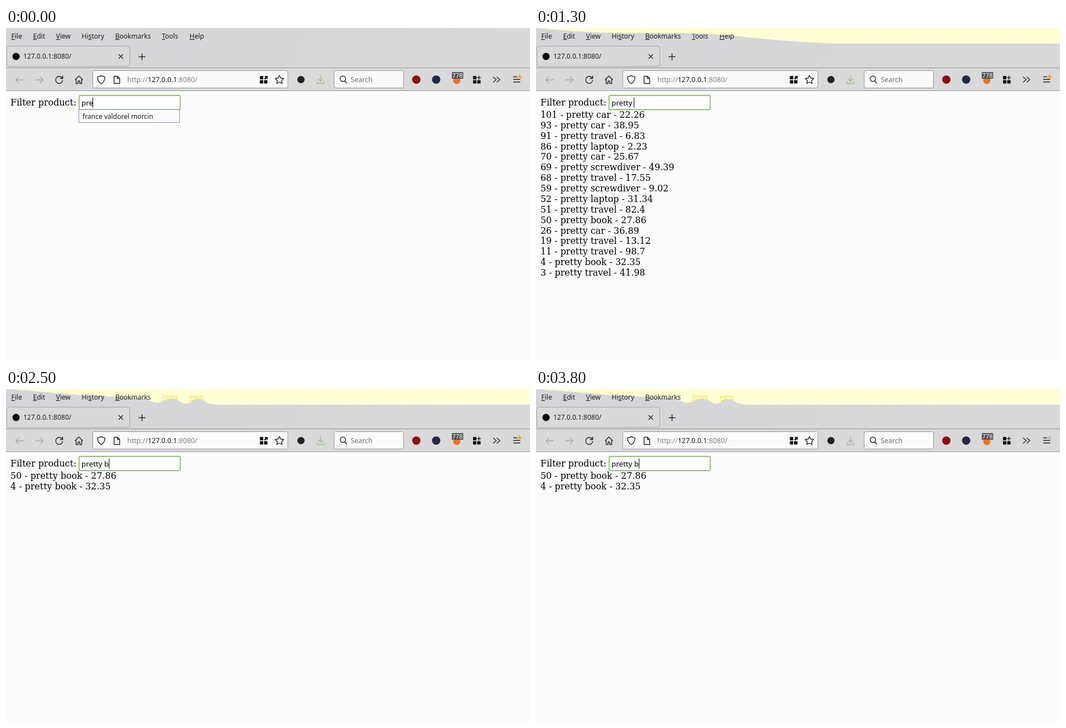
Recreate the animation shown at these times as an HTML page. Size 938 by 597 pixels, loop 3900 ms.

```html
<!DOCTYPE html>
<html lang="en">
<head>
<meta charset="utf-8">
<title>Product filter</title>
<style>
  html, body { margin: 0; width: 100%; height: 100%; overflow: hidden; background: #fcfcfd; }
  svg { display: block; }
  text { white-space: pre; }
  .ui { font: 12px "Noto Sans", sans-serif; fill: #1c1c1c; }
  .field { font-size: 12.4px; }
  .page { font: 15.9px "DejaVu Serif", serif; fill: #000; }
  .typed { font: 13.33px "Noto Sans", sans-serif; fill: #000; }
  .icon { fill: none; stroke: #222; stroke-width: 1.4; stroke-linecap: round; stroke-linejoin: round; }
  .pale { stroke: #a9aaa3; }
  .solid { fill: #111; }
</style>
</head>
<body>
<svg width="938" height="597" viewBox="0 0 938 597">
  <defs>
    <linearGradient id="chrome">
      <stop offset="0" stop-color="#d5d5d9"/>
      <stop offset="1" stop-color="#d9d9d8"/>
    </linearGradient>
    <linearGradient id="glow" x2="0" y2="28" gradientUnits="userSpaceOnUse">
      <stop offset="0" stop-color="#ffffce"/>
      <stop offset="1" stop-color="#ffffdc"/>
    </linearGradient>
    <clipPath id="belowWash"><path d="M0 0L140 9L260 10L345 12H938V30H0Z"/></clipPath>
  </defs>

  <rect width="938" height="597" fill="#fcfcfd"/>
  <rect width="938" height="112" fill="url(#chrome)"/>
  <rect y="72" width="938" height="40" fill="#d9d9d9"/>
  <path d="M0 71.5H938M0 112.5H938" stroke="#97979b"/>

  <path id="wash" fill="url(#glow)"/>
  <g id="menu" class="ui"></g>

  <!-- tab -->
  <rect x="1.5" y="32.5" width="220" height="36.5" rx="4" fill="#d9d9d9" stroke="#a6a6ac"/>
  <circle cx="18" cy="51" r="6.5"/>
  <text class="ui" x="31" y="55">127.0.0.1:8080/</text>
  <path class="icon" d="M202 47.5l7 7m0-7l-7 7M238 51.5h11M243.5 46v11"/>

  <!-- navigation -->
  <path class="icon pale" d="M31 93H17.5m5.5-5.5L17.5 93l5.5 5.5M53 93h13.5m-5.5-5.5l5.5 5.5l-5.5 5.5"/>
  <path class="icon" d="M100.5 89.5a6.3 6.3 0 1 0 1 4.5M101.5 86v4.5h-4.5"/>
  <path class="icon" d="M124 92.5l6.5-6.5l6.5 6.5M125.500 91.500v8h3.500v-4.500h3v4.500h3.500v-8"/>

  <!-- address and search fields -->
  <g fill="#fafafb" stroke="#9b9ba0">
    <rect x="155.5" y="76.5" width="349" height="31" rx="3"/>
    <rect x="587.5" y="76.5" width="124" height="31" rx="3"/>
  </g>
  <path class="icon" d="M170.5 85.5l6.5 2.3c0 6-2 9.700-6.5 12.200c-4.5-2.5-6.5-6.200-6.5-12.200z"/>
  <path class="icon" d="M193.5 86.5h6l4 4v9h-10zM199.5 86.5v4h4"/>
  <text class="ui field" x="217" y="97"><tspan fill="#808080">http://</tspan>127.0.0.1<tspan fill="#808080">:8080/</tspan></text>
  <path class="solid" d="M454.5 86h6v6h-6zm0 7.5h6v6h-6zm7.5 0h6v6h-6z"/>
  <path class="solid" d="M462.5 86h6v6l-2-2l-2.5 2.5l-2-2l2.5-2.5z"/>
  <path id="star" class="icon"/>
  <circle cx="603" cy="91" r="4.8" class="icon"/>
  <path class="icon" d="M606.5 95l3.5 4"/>
  <text class="ui field" x="617" y="97" style="fill:#707070">Search</text>

  <!-- toolbar buttons -->
  <circle cx="528" cy="92.5" r="6.5" fill="#222"/>
  <path class="icon" style="stroke:#a3bb98" d="M563 85.5v10m-4-4l4 4l4-4M557 96v3.5h12V96"/>
  <circle cx="734.5" cy="92.5" r="7.5" fill="#8d0b14"/>
  <circle cx="770" cy="92.5" r="7.5" fill="#252947"/>
  <circle cx="807" cy="94" r="6.5" fill="#ee7129"/>
  <rect x="798" y="79" width="20.5" height="12" rx="1" fill="#555"/>
  <text class="ui" x="808.2" y="89" text-anchor="middle" style="font-size:11px;fill:#fff">778</text>
  <path class="solid" d="M836 86h6v6h-6zm0 7.5h6v6h-6zm7.5 0h6v6h-6z"/>
  <path class="icon" d="M846.5 86v6M843.5 89h6"/>
  <path class="icon" d="M872.5 88l5 4.5l-5 4.5M879 88l5 4.5l-5 4.5"/>
  <path class="icon" d="M908.5 87.5h6M908.5 92.2h11.5M908.5 96.8h11.5"/>
  <path id="alert" d="M919.5 82.5l4 7h-8z"/>

  <!-- page -->
  <text class="page" x="8" y="139">Filter product:</text>
  <rect x="129.5" y="119.5" width="183.5" height="28" rx="3" fill="none" stroke="#e4f0dc"/>
  <rect x="131" y="121" width="180.7" height="25.3" rx="2" fill="#fff" stroke="#79ae58" stroke-width="1.4"/>
  <text id="typed" class="typed" x="135" y="139"></text>
  <path id="caret" stroke="#000" d="M.5 124.5v18.5"/>
  <g id="rows" class="page"></g>
  <g id="suggestion">
    <rect x="130.5" y="146.5" width="180" height="23" fill="#fcfcfd" stroke="#9292b4"/>
    <text class="ui" x="137" y="163">france valdorel morcin</text>
  </g>
</svg>

<script>
const LOOP = 3900;
const $ = id => document.getElementById(id);

function addText(parent, x, y, content) {
  const node = document.createElementNS("http://www.w3.org/2000/svg", "text");
  node.setAttribute("x", x);
  node.setAttribute("y", y);
  node.textContent = content;
  parent.append(node);
  return node;
}

// Menu labels: position, text, index of the underlined letter
const menu = [
  [9.5, "File", 0], [48.5, "Edit", 0], [89.5, "View", 0], [135.5, "History", 2],
  [195.5, "Bookmarks", 0], [279, "Tools", 0], [328.5, "Help", 0]
];
const labels = menu.map(([x, label, key]) => {
  const node = addText($("menu"), x, 19, label.slice(0, key));
  const accent = document.createElementNS(node.namespaceURI, "tspan");
  accent.setAttribute("text-decoration", "underline");
  accent.textContent = label[key];
  node.append(accent, label.slice(key + 1));
  return node;
});
const tintedLabels = labels.slice(-2);

const starPoints = Array.from({ length: 10 }, (_, i) => {
  const angle = i * Math.PI / 5, radius = i % 2 ? 4 : 8;
  return `${489.5 + radius * Math.sin(angle)} ${93 - radius * Math.cos(angle)}`;
});
$("star").setAttribute("d", `M${starPoints.join("L")}Z`);

const products = `101 - pretty car - 22.26
93 - pretty car - 38.95
91 - pretty travel - 6.83
86 - pretty laptop - 2.23
70 - pretty car - 25.67
69 - pretty screwdiver - 49.39
68 - pretty travel - 17.55
59 - pretty screwdiver - 9.02
52 - pretty laptop - 31.34
51 - pretty travel - 82.4
50 - pretty book - 27.86
26 - pretty car - 36.89
19 - pretty travel - 13.12
11 - pretty travel - 98.7
4 - pretty book - 32.35
3 - pretty travel - 41.98`.split("\n");
const books = products.filter(line => line.includes("book"));
const rows = products.map((_, i) => addText($("rows"), 8, Math.round(161 + i * 18.87), ""));

const smoothWash = "M0 0Q70 7 140 9L265 9Q310 10 355 14Q450 25 540 28H938V0Z";
const bumpyWash = "M0 0L65 5L135 11L195 14Q230 15 255 19Q263 25 272 24.5Q281 24 285 20" +
  "Q300 15 309 20Q315 27 324 26Q331 25 333 20Q346 15 356 22Q362 28 382 28H938V0Z";

// Each list holds [start time, value]; a value lasts until the next start.
const typing = [[0, "pre"], [200, "pret"], [400, "pretty"], [800, "pretty "], [1500, "pretty b"]];
const results = [
  [0, []], [200, products.slice(0, 10)], [400, products], [500, []],
  [700, products], [900, []], [1100, products], [1800, []], [2000, books]
];
const washes = [[0, ""], [100, bumpyWash], [900, smoothWash], [2200, bumpyWash]];
const carets = [[0, true], [2000, false], [2400, true], [2900, false], [3400, true]];
const alerts = [[0, "#ff9d1c"], [3400, "#b9b9b9"]];

const valueAt = (steps, time) => steps.findLast(([start]) => start <= time)[1];
const show = (id, visible) => $(id).setAttribute("visibility", visible ? "visible" : "hidden");

const pen = document.createElement("canvas").getContext("2d");
pen.font = '13.33px "Noto Sans", sans-serif';

function drawWash(shape) {
  $("wash").setAttribute("d", shape);
  $("menu").setAttribute("clip-path", shape ? "url(#belowWash)" : "none");
  for (const label of tintedLabels) label.style.fill = shape === bumpyWash ? "#eee04c" : "";
}

function draw(time) {
  const query = valueAt(typing, time);
  const lines = valueAt(results, time);
  $("typed").textContent = query;
  $("caret").setAttribute("transform", `translate(${Math.round(134.5 + pen.measureText(query).width)})`);
  rows.forEach((row, i) => row.textContent = lines[i] || "");
  drawWash(valueAt(washes, time));
  $("alert").setAttribute("fill", valueAt(alerts, time));
  show("caret", valueAt(carets, time));
  show("suggestion", time < 100);
}

const began = performance.now();
function tick() {
  draw((performance.now() - began) % LOOP);
  requestAnimationFrame(tick);
}
tick();
</script>
</body>
</html>
```
